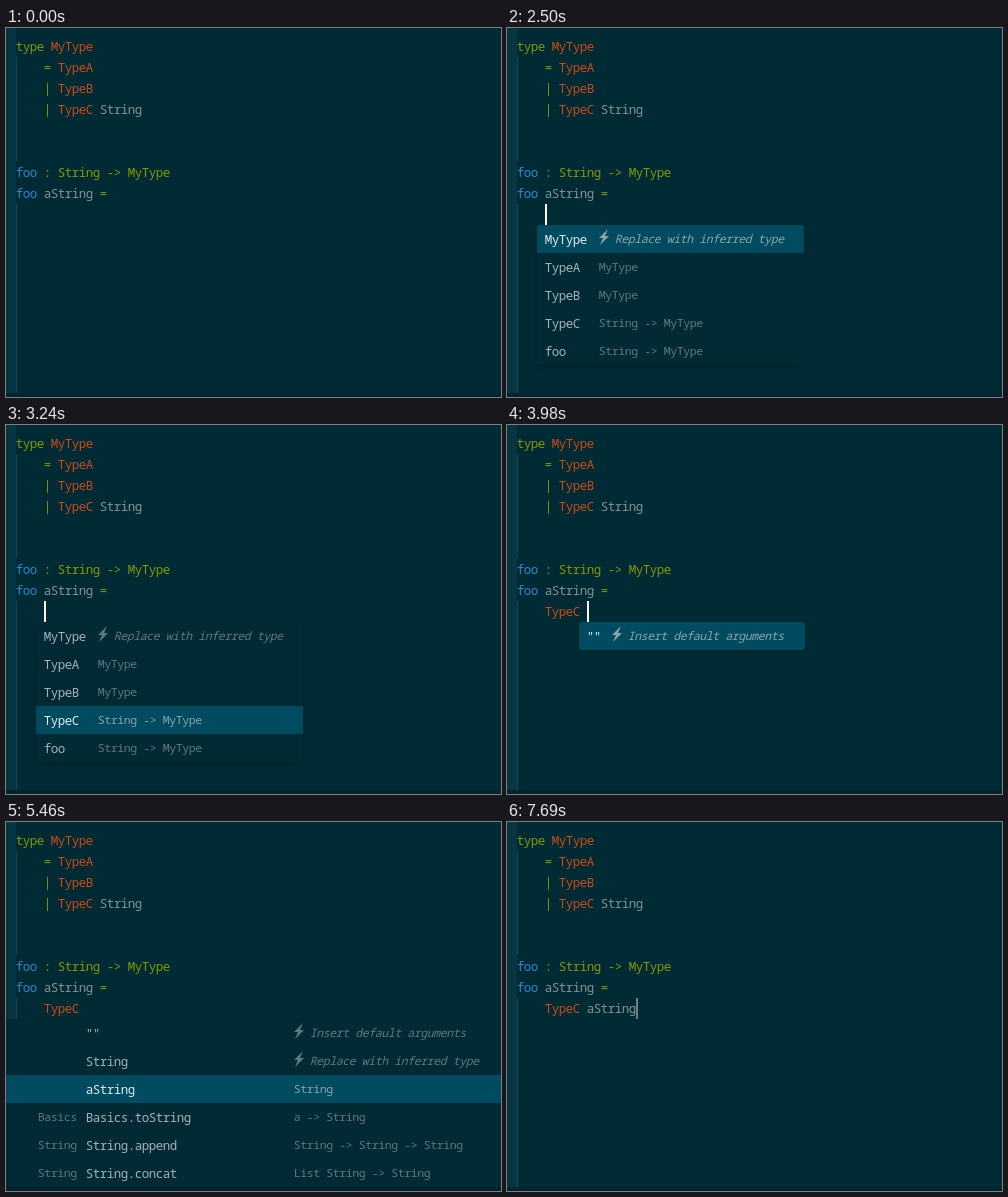
Animation of 495x369 px, one loop 7.79 s. Source, as an HTML page with a canvas:

```html
<!DOCTYPE html>
<html lang="en">
<head>
<meta charset="utf-8">
<title>Code completion</title>
<style>
  html, body { margin: 0; width: 100%; height: 100%; overflow: hidden; background: #002b34; }
  canvas { display: block; }
</style>
</head>
<body>
<canvas id="stage" width="495" height="369"></canvas>
<script>
const ctx = document.getElementById('stage').getContext('2d');
const LOOP = 7790;
const MONO = '"Noto Sans Mono", "DejaVu Sans Mono", monospace';
const CODE = { font: `12.5px ${MONO}`, tracking: -0.5 };
const SMALL = { font: `11.6px ${MONO}`, tracking: -0.46 };
const ITALIC = { font: `italic 11.6px ${MONO}`, tracking: -0.46 };

const GREEN = '#859900', ORANGE = '#cb4b16', GREY = '#839496', BLUE = '#268bd2';
const MUTED = '#607980', ITEM = '#a4b4b6', SELECTED = '#004b5f', PANEL = '#012a35';
const GUIDE = '#0b4c5a';

const CHAR = 7, LEFT = 10, LINE = 21, ROW = 28, POPUP_TOP = 197;

// Each token: line, column, text, colour
const code = [
  [0, 0, 'type', GREEN], [0, 5, 'MyType', ORANGE],
  [1, 4, '=', GREEN], [1, 6, 'TypeA', ORANGE],
  [2, 4, '|', GREEN], [2, 6, 'TypeB', ORANGE],
  [3, 4, '|', GREEN], [3, 6, 'TypeC', ORANGE], [3, 12, 'String', GREY],
  [6, 0, 'foo', BLUE], [6, 4, ':', GREEN], [6, 6, 'String -> MyType', GREEN],
  [7, 0, 'foo', BLUE], [7, 4, 'aString', GREY], [7, 12, '=', GREEN]
];

// Popup rows: name, label, and an optional module; a leading "!" marks an action
const INSERT = ['""', '!Insert default arguments'];
const typePopup = {
  x: 30, w: 267, nameX: 38, labelX: 92,
  rows: [
    ['MyType', '!Replace with inferred type'],
    ['TypeA', 'MyType'],
    ['TypeB', 'MyType'],
    ['TypeC', 'String -> MyType'],
    ['foo', 'String -> MyType']
  ]
};
const insertPopup = { x: 72, w: 226, nameX: 80, labelX: 105, rows: [INSERT] };
const widePopup = {
  x: 0, w: 495, nameX: 80, labelX: 288,
  rows: [
    INSERT,
    ['String', '!Replace with inferred type'],
    ['aString', 'String'],
    ['Basics.toString', 'a -> String', 'Basics'],
    ['String.append', 'String -> String -> String', 'String'],
    ['String.concat', 'List String -> String', 'String']
  ]
};

// Editor states from a start time: cursor line and column, popup, selected row
const states = [
  [0, 7, 13],
  [1400, 8, 4],
  [2120, 8, 4, typePopup, 0],
  [2560, 8, 4, typePopup, 1],
  [2710, 8, 4, typePopup, 2],
  [2860, 8, 4, typePopup, 3],
  [3320, 8, 9],
  [3760, 8, 10],
  [3900, 8, 10, insertPopup, 0],
  [4490, 8, 10, widePopup, 0],
  [5240, 8, 10, widePopup, 1],
  [5390, 8, 10, widePopup, 2],
  [6260, 8, 17]
];

// Cursor blink: fades in and out by turns at these times
const FADE = 200;
const blinks = [
  [70, 1], [480, 0], [860, 1], [1270, 0], [1400, 1], [1840, 0], [2240, 1],
  [2690, 0], [3040, 1], [4330, 0], [4730, 1], [5090, 0], [5530, 1],
  [5930, 0], [6260, 1], [6760, 0], [7160, 1], [7580, 0]
];

const latest = (list, t) => list.filter(item => item[0] <= t).pop();

function snap(t) {
  const start = k => k * (146.5 + 0.028 * k);
  let k = 0;
  while (start(k + 1) - 10 <= t) k++;
  return start(k);
}

function cursorAlpha(t) {
  const blink = latest(blinks, t);
  if (!blink) return 0;
  const p = Math.min(1, (t - blink[0]) / FADE);
  return blink[1] ? p : 1 - p;
}

function rect(x, y, w, h, color) {
  ctx.fillStyle = color;
  ctx.fillRect(x, y, w, h);
}

function text(str, x, y, color, style = CODE, align = 'left') {
  ctx.font = style.font;
  ctx.letterSpacing = `${style.tracking}px`;
  ctx.fillStyle = color;
  ctx.textAlign = align;
  ctx.fillText(str, x + style.tracking / 2, y);
}

function token([line, col, str, color]) {
  text(str, LEFT + col * CHAR, 23 + line * LINE, color);
}

function bolt(x, y, color) {
  ctx.save();
  ctx.translate(x, y);
  ctx.fillStyle = color;
  ctx.fill(new Path2D('M10 7H6l3-7-9 9h4l-3 7z'));
  ctx.restore();
}

function drawRow({ x, w, nameX, labelX }, [name, label, module], y, active) {
  const labelColor = active ? '#8ba5ab' : MUTED;
  if (active) rect(x, y, w, ROW, SELECTED);
  if (module) text(module, 71, y + 18, MUTED, SMALL, 'right');
  text(name, nameX, y + 19, active ? '#e3eaea' : ITEM);
  if (label[0] === '!') {
    bolt(labelX, y + 4, labelColor);
    text(label.slice(1), labelX + 16, y + 18, labelColor, ITALIC);
  } else {
    text(label, labelX, y + 18, labelColor, SMALL);
  }
}

function drawPopup(popup, selected) {
  const { x, w, rows } = popup;
  const panel = new Path2D();
  panel.roundRect(x, POPUP_TOP, w, rows.length * ROW, x ? 3 : 0);

  ctx.save();
  ctx.shadowColor = 'rgba(0, 0, 0, 0.2)';
  ctx.shadowBlur = 4;
  ctx.shadowOffsetY = 2;
  ctx.fillStyle = PANEL;
  ctx.fill(panel);
  ctx.restore();

  ctx.save();
  ctx.clip(panel);
  rows.forEach((row, i) => drawRow(popup, row, POPUP_TOP + i * ROW, i === selected));
  ctx.restore();
}

function draw(t) {
  const [, line, col, popup, selected] = latest(states, t);

  rect(0, 0, 495, 369, '#002b34');
  rect(0, 0, 10, 369, '#073642');
  rect(10, 29, 1, 104, GUIDE);
  rect(10, 176, 1, 193, GUIDE);
  rect(0, 365, 495, 4, '#00252e');

  code.forEach(token);
  if (t >= 3320) token([8, 4, 'TypeC', ORANGE]);
  if (t >= 6260) token([8, 10, 'aString', GREY]);

  if (popup) drawPopup(popup, selected);

  ctx.globalAlpha = cursorAlpha(t);
  rect(LEFT + col * CHAR, 8 + line * LINE, 2, LINE, '#fdf6e3');
  ctx.globalAlpha = 1;
}

const begin = performance.now();
function tick() {
  draw(snap((performance.now() - begin) % LOOP));
  requestAnimationFrame(tick);
}
tick();
</script>
</body>
</html>
```
